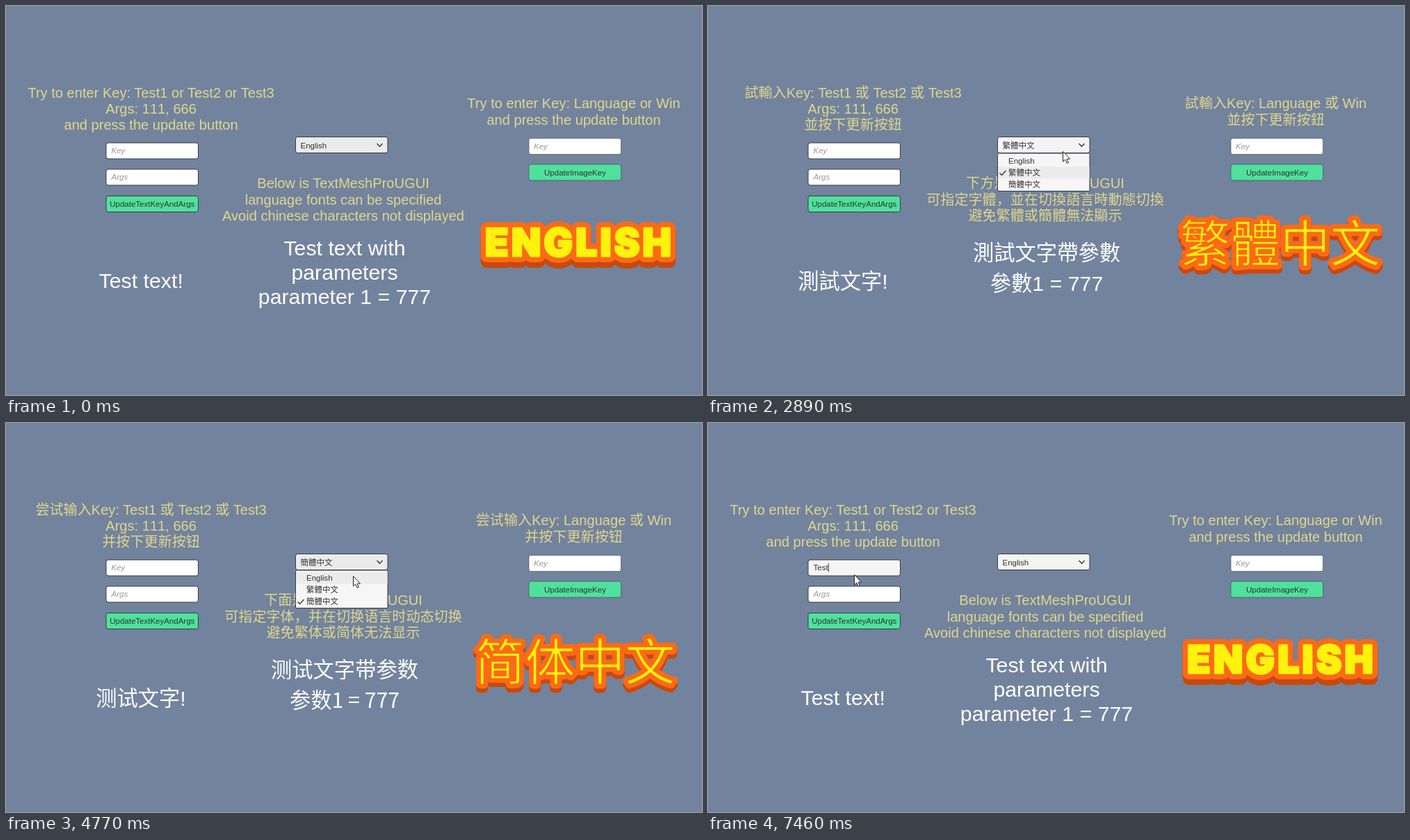
An HTML page that plays this animation: 1001 by 560 pixels, repeating every 8000 ms.

```html
<!DOCTYPE html>
<html lang="en">
<head>
<meta charset="utf-8">
<title>Language switch demo</title>
<style>
  html, body { margin: 0; width: 100%; height: 100%; overflow: hidden; background: #72839d; }
  svg { display: block; width: 100vw; height: 100vh; }
  text { font: 11.5px "Liberation Sans", "Noto Sans CJK SC", "Noto Sans CJK JP", "Noto Sans CJK", sans-serif; fill: #323232; }
  .mid { text-anchor: middle; }
  .hint { font-size: 20.1px; fill: #e0d78b; text-anchor: middle; }
  .big { font-size: 30.3px; fill: #fff; text-anchor: middle; }
  .cjk { font-family: "Noto Sans CJK SC", "Noto Sans CJK JP", "Noto Sans CJK", sans-serif; }
  .plain { font-kerning: none; }
  .ghost { font-style: italic; fill: #98989c; }
  .box { stroke: #343a44; stroke-width: 1; }
  .soft .box { stroke-opacity: .55; }
  .line { fill: none; stroke: #323232; stroke-width: 1.3; }
  .art { text-anchor: middle; stroke-linejoin: round; font-size: 72px; }
  .latin { font: 900 55px Inter, Lato, sans-serif; letter-spacing: 4.2px; }
</style>
</head>
<body>
<svg id="stage" viewBox="0 0 1001 560"></svg>
<script>
const stage = document.getElementById('stage');
const names = ['English', '繁體中文', '簡體中文'];
const yellow = '#fff20d', orange = '#fc6a17', rust = '#c8490f';

const text = (x, y, s, cls = '', id = '') => `<text x="${x}" y="${y}" class="${cls}" id="${id}">${s}</text>`;
const box = (x, y, fill, id = '') =>
  `<rect x="${x}" y="${y}" width="132.5" height="23" rx="3" class="box" fill="${fill}" id="${id}"/>`;
const lines = (x, y, step, cls, list) => list.map((s, i) =>
  text(x, y + i * step, s, cls + (s.startsWith('Args') ? ' plain' : ''))).join('');

// Yellow lettering on an extruded orange outline; the rim fattens or thins the face
function art(x, y, s, cls, edge, depth, rim, rimWidth) {
  const layer = (dy, fill, stroke, width) =>
    `<text x="${x}" y="${y + dy}" class="art ${cls}" style="fill:${fill};stroke:${stroke};stroke-width:${width}">${s}</text>`;
  return layer(depth, rust, rust, edge) + layer(depth / 2, rust, rust, edge) +
    layer(0, orange, orange, edge) + layer(0, yellow, rim, rimWidth);
}

const pages = [
  lines(208.6, 131.6, 23.3, 'hint', ['Try to enter Key: Test1 or Test2 or Test3', 'Args: 111, 666', 'and press the update button']) +
  lines(816.5, 147.3, 23.3, 'hint', ['Try to enter Key: Language or Win', 'and press the update button']) +
  lines(485, 262.2, 23.3, 'hint', ['Below is TextMeshProUGUI', 'language fonts can be specified', 'Avoid chinese characters not displayed']) +
  lines(487, 358.5, 35, 'big', ['Test text with', 'parameters', 'parameter 1 = 777']) +
  text(194.2, 406.3, 'Test text!', 'big') +
  art(825, 359.8, 'ENGLISH', 'latin', 18, 8, yellow, 3),

  lines(208.6, 131.6, 23.3, 'hint', ['試輸入Key: Test1 或 Test2 或 Test3', 'Args: 111, 666', '並按下更新按鈕']) +
  lines(816.5, 147.3, 23.3, 'hint', ['試輸入Key: Language 或 Win', '並按下更新按鈕']) +
  lines(485, 262.2, 23.3, 'hint', ['下方是TextMeshProUGUI', '可指定字體，並在切換語言時動態切換', '避免繁體或簡體無法顯示']) +
  lines(487, 366, 44, 'big', ['測試文字帶參數', '參數1 = 777']) +
  text(194, 406.8, '測試文字!', 'big') +
  art(823, 368, '繁體中文', 'cjk', 12, 6, orange, 1.6),

  lines(208.6, 131.6, 23.3, 'hint', ['尝试输入Key: Test1 或 Test2 或 Test3', 'Args: 111, 666', '并按下更新按钮']) +
  lines(816.5, 147.3, 23.3, 'hint', ['尝试输入Key: Language 或 Win', '并按下更新按钮']) +
  lines(485, 262.2, 23.3, 'hint', ['下面是TextMeshProUGUI', '可指定字体，并在切换语言时动态切换', '避免繁体或简体无法显示']) +
  lines(487, 366, 44, 'big cjk', ['测试文字带参数', '参数1 = 777']) +
  text(194, 406.8, '测试文字!', 'big') +
  art(818.5, 370, '简体中文', 'cjk', 12, 6, orange, 1.6)
];

stage.innerHTML =
  pages.map((p, i) => `<g id="page${i}">${p}</g>`).join('') +
  box(144, 197, '#fff', 'field') + text(151.5, 212, 'Key', 'ghost', 'keyHint') + text(151.5, 212, '', '', 'typed') +
  '<rect id="caret" y="202" width="1" height="12.5" fill="#323232"/>' +
  box(144, 235, '#fff') + text(151.5, 250, 'Args', 'ghost') +
  box(144, 273.5, '#4fe19c') + text(210.3, 289.2, 'UpdateTextKeyAndArgs', 'mid') +
  '<g class="soft">' + box(752, 190.5, '#fff') + box(752, 228, '#4fe19c') + '</g>' +
  text(759, 205.5, 'Key', 'ghost') + text(818.5, 244, 'UpdateImageKey', 'mid') +
  box(416.5, 188.5, '#ebebeb', 'head') + text(423.5, 204.5, '', '', 'label') +
  '<path class="line" d="M533.5 198l4 4.2l4-4.2"/>' +
  '<g id="list"><rect x="416.5" y="212" width="132.5" height="54.5" rx="1.5" class="box" fill="#f6f6f6"/>' +
  '<rect id="row" x="417" width="131.5" height="17" fill="#ebebeb"/>' +
  names.map((n, i) => text(432, 227.2 + 17 * i, n)).join('') +
  '<path id="check" class="line" d="M419.5 0l3 3l6-6.5"/></g>' +
  '<path id="mouse" fill="#fff" stroke="#222" d="M.5.5V15L3.8 12L6.3 17.3L8.4 16.3L6 11.2H10.5Z"/>';

const el = {};
stage.querySelectorAll('[id]').forEach(n => { if (n.id) el[n.id] = n; });

// time, x, y of the pointer tip
const path = [
  [70, 588, 380], [570, 511, 198], [970, 511, 198], [1400, 511, 242], [2150, 511, 242],
  [2290, 511, 206], [2750, 510, 206], [2890, 510, 209], [3530, 510, 251], [3870, 510, 251],
  [4080, 499, 198], [4350, 499, 198], [4770, 499, 220], [5100, 499, 220], [5810, 190, 206],
  [5930, 196, 206], [6930, 196, 206], [7300, 210, 218]
];
const opened = [[940, 1660], [2750, 3600], [4300, 5030]];
const clamp = v => Math.max(0, Math.min(1, v));

function pointer(t) {
  const i = path.findIndex(p => p[0] > t);
  if (i < 0) return path[path.length - 1].slice(1);
  if (i === 0) return path[0].slice(1);
  const [t0, x0, y0] = path[i - 1], [t1, x1, y1] = path[i];
  const u = (t - t0) / (t1 - t0), k = u * u * (3 - 2 * u);
  return [x0 + (x1 - x0) * k, y0 + (y1 - y0) * k];
}

const show = (node, on) => { node.style.display = on ? '' : 'none'; };

function draw(t) {
  const lang = t < 1660 || t >= 5030 ? 0 : t < 3600 ? 1 : 2;
  pages.forEach((_, i) => show(el['page' + i], i === lang));
  el.label.textContent = names[lang];

  const [x, y] = pointer(t);
  show(el.mouse, t >= 70);
  el.mouse.setAttribute('transform', `translate(${x} ${y})`);

  const alpha = Math.max(...opened.map(([a, b]) => clamp(Math.min((t - a) / 130, 1 - (t - b) / 150))));
  el.list.style.opacity = alpha;
  const row = y < 214.5 ? lang : Math.min(2, Math.floor((y - 214.5) / 17));
  el.row.setAttribute('y', 214.5 + 17 * row);
  el.check.setAttribute('transform', `translate(0 ${223.5 + 17 * lang})`);
  el.head.setAttribute('fill', t >= 2750 && t < 3600 || t >= 6140 ? '#f4f4f4' : '#ebebeb');

  el.field.setAttribute('fill', t < 5740 ? '#fff' : t < 6140 ? '#f1f0f2' : '#f5f5f5');
  const count = [6730, 6990, 7200, 7460].filter(k => t >= k).length;
  show(el.keyHint, !count);
  el.typed.textContent = 'Test'.slice(0, count);
  show(el.caret, t >= 6140);
  el.caret.setAttribute('x', 151.7 + (count ? el.typed.getComputedTextLength() : 0));
}

const start = performance.now();
function tick() {
  draw((performance.now() - start) % 8000);
  requestAnimationFrame(tick);
}
tick();
</script>
</body>
</html>
```
